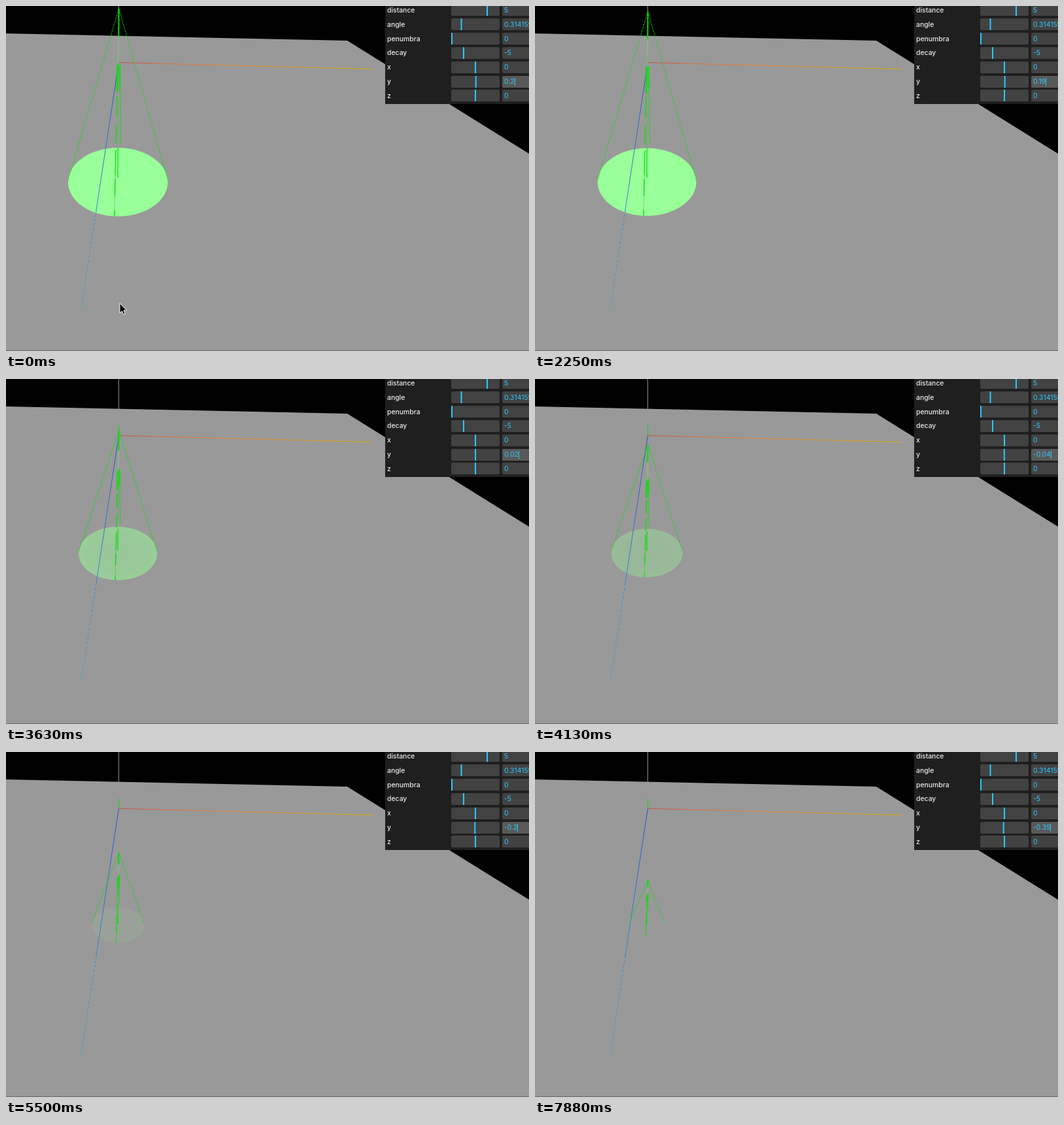
Recreate the animation shown at these times as an HTML page with a canvas. Size 800 px wide and 528 px high, loop 8 s.

```html
<!DOCTYPE html>
<html lang="en">
<head>
<meta charset="utf-8">
<title>Spot light controls</title>
<style>
html, body { margin: 0; width: 100%; height: 100%; overflow: hidden; background: #000; }
canvas { display: block; }
</style>
</head>
<body>
<canvas id="stage" width="800" height="528"></canvas>
<script>
const ctx = document.getElementById('stage').getContext('2d');
const LOOP = 8000, TICK = 125;
const GREEN = '#0fdc0f', ACCENT = '#2cc9ff';

// [time, light height]
const heights = [[0, .2], [2125, .2], [2250, .19], [3000, .1], [3625, .02], [4625, -.1],
  [6375, -.3], [7000, -.37], [7125, -.37], [7500, -.36], [7750, -.36], [7875, -.35]];
// [time, x, y]
const pointer = [[0, 174, 455], [125, 174, 455], [750, 330, 439], [1000, 330, 439], [1750, 776, 112]];

// [label, value, handle x]
const rows = [['distance', '5', 736], ['angle', '0.3141592653589793', 696.5], ['penumbra', '0', 682],
  ['decay', '-5', 700], ['x', '0', 718], ['y', '', 718], ['z', '0', 718]];

function sample(keys, t, col) {
  let i = 0;
  while (i < keys.length - 1 && keys[i + 1][0] <= t) i++;
  const a = keys[i], b = keys[i + 1] || a;
  const k = b === a ? 0 : (t - a[0]) / (b[0] - a[0]);
  return a[col] + (b[col] - a[col]) * k;
}

function poly(points, fill) {
  ctx.beginPath();
  points.forEach(p => ctx.lineTo(p[0], p[1]));
  ctx.closePath();
  ctx.fillStyle = fill;
  ctx.fill();
}

function line(a, b, color, width = 1, dash = [], alpha = 1) {
  ctx.save();
  ctx.globalAlpha = alpha;
  ctx.setLineDash(dash);
  ctx.strokeStyle = color;
  ctx.lineWidth = width;
  ctx.beginPath();
  ctx.moveTo(a[0], a[1]);
  ctx.lineTo(b[0], b[1]);
  ctx.stroke();
  ctx.restore();
}

function part(a, b, from, to, color, width, alpha) {
  const at = k => [a[0] + (b[0] - a[0]) * k, a[1] + (b[1] - a[1]) * k];
  line(at(from), at(to), color, width, [], alpha);
}

function ramp(a, b, colors) {
  const g = ctx.createLinearGradient(a[0], a[1], b[0], b[1]);
  colors.forEach((c, i) => g.addColorStop(i / (colors.length - 1), c));
  return g;
}

// grey ground plus green light, added in linear space
function lit(amount) {
  const lin = Math.min(1, .319 + amount);
  return `rgb(153,${Math.round(255 * (1.055 * lin ** (1 / 2.4) - .055))},153)`;
}

function ground() {
  ctx.fillStyle = '#000';
  ctx.fillRect(0, 0, 800, 528);
  poly([[0, 42], [522, 53], [800, 226], [800, 528], [0, 528]], '#999');
  ctx.fillStyle = '#666';
  ctx.fillRect(0, 527, 800, 1);
}

function pool(s) {
  ctx.save();
  ctx.translate(s.cx, s.cy);
  ctx.scale(s.rx, s.ry);
  const g = ctx.createRadialGradient(0, 0, 0, 0, 0, 1);
  const power = (s.y + .65) ** 5;
  g.addColorStop(0, lit(power * 1.75));
  g.addColorStop(.6, lit(power * 1.9));
  g.addColorStop(1, lit(power * 2.2));
  ctx.fillStyle = g;
  ctx.beginPath();
  ctx.arc(0, 0, 1, 0, 7);
  ctx.fill();
  ctx.restore();
}

function axes() {
  const o = [172.5, 86.5], x = [560, 96.5], z = [115, 463];
  line([172.5, 0], [172.5, 46], '#8c8c8c');
  line([172.5, 71], [172.5, 86], '#14d214');
  line(o, x, ramp(o, x, ['#c0533f', '#e8743a', '#e88a2c', '#dc9a1e', '#e0a800']));
  const blue = ramp(o, z, ['#2a50c8', '#3070cc', '#3a8fd0', '#38a4d0']);
  part(o, z, 0, .6, blue, 1, 1);
  line([138.2, 312], z, blue, 1, [4, 3]);
}

function cone(s) {
  const tip = [172.6, s.tip];
  for (const side of [-1, 1]) {
    const end = [s.cx + side * s.rx, s.cy - 3];
    line(tip, end, GREEN, 1, [], .4);
    line(tip, end, GREEN, 1, [2, 3], .85);
  }
  const front = [s.cx - s.rx * .07, s.cy + s.ry];
  const back = [s.cx + s.rx * .06, s.cy - s.ry];
  const mid = [171, 263];
  part(tip, mid, 0, .17, GREEN, 2, 1);
  part(tip, mid, .17, .34, '#b4b4b4', 2, .6);
  part(tip, mid, .17, .82, GREEN, 1, .3);
  part(tip, mid, .82, 1, GREEN, 1.3, 1);
  part(tip, front, .27, .4, GREEN, 3, .9);
  part(tip, back, .4, .57, GREEN, 2.5, .8);
  part(tip, back, .57, .97, GREEN, 1.2, .7);
  for (const [a, b] of [[.42, .52], [.56, .65], [.68, .8], [.82, .9], [.97, 1]])
    part(tip, front, a, b, GREEN, 1.5, .9);
  part(tip, front, .8, 1, GREEN, 1, .45);
}

function panel(y) {
  ctx.fillStyle = '#1f1f1f';
  ctx.fillRect(580, 0, 220, 150);
  rows.forEach(([label, value, handle], i) => {
    const cy = 6.2 + 21.87 * i, top = Math.round(cy - 9), active = label === 'y';
    if (active) {
      value = String(+y.toFixed(2));
      handle += 3.7 * y;
    }
    ctx.fillStyle = '#424242';
    ctx.beginPath();
    ctx.roundRect(681, top, 74, 18, 2);
    ctx.fill();
    ctx.fillStyle = active ? '#595959' : '#424242';
    ctx.beginPath();
    ctx.roundRect(759, top, 50, 18, 2);
    ctx.fill();
    ctx.fillStyle = ACCENT;
    ctx.fillRect(handle - 1, top, 2, 18);
    ctx.font = '500 10.4px Inter, sans-serif';
    ctx.fillStyle = '#ebebeb';
    ctx.fillText(label, 583, cy + 3.6);
    ctx.font = '400 10.4px Inter, sans-serif';
    ctx.fillStyle = ACCENT;
    ctx.fillText(value, 762, cy + 3.6);
    if (active) ctx.fillRect(Math.round(762 + ctx.measureText(value).width), top + 3, 1, 12);
  });
}

function arrow(x, y) {
  ctx.save();
  ctx.translate(x, y);
  poly([[0, 0], [0, 15], [3.4, 12], [5.8, 17], [8.2, 16], [6, 11], [10.5, 10.6]], '#000');
  ctx.strokeStyle = '#fff';
  ctx.lineWidth = 1;
  ctx.stroke();
  ctx.restore();
}

function draw(t) {
  const y = Math.round(sample(heights, t, 1) * 100) / 100;
  const spot = {
    y,
    cx: 171.2,
    cy: 266.8 + 11 * y + 14 * y * y,
    rx: 58.2 + 90.5 * y,
    ry: 39.7 + 64 * y,
    tip: 86 - 375 * y - 175 * y * y
  };
  ground();
  pool(spot);
  axes();
  cone(spot);
  panel(y);
  if (t < 1875) arrow(sample(pointer, t, 1), sample(pointer, t, 2));
}

const start = performance.now();
function frame() {
  const t = (performance.now() - start) % LOOP;
  draw(Math.floor((t + 5) / TICK) * TICK % LOOP);
  requestAnimationFrame(frame);
}
frame();
</script>
</body>
</html>
```
